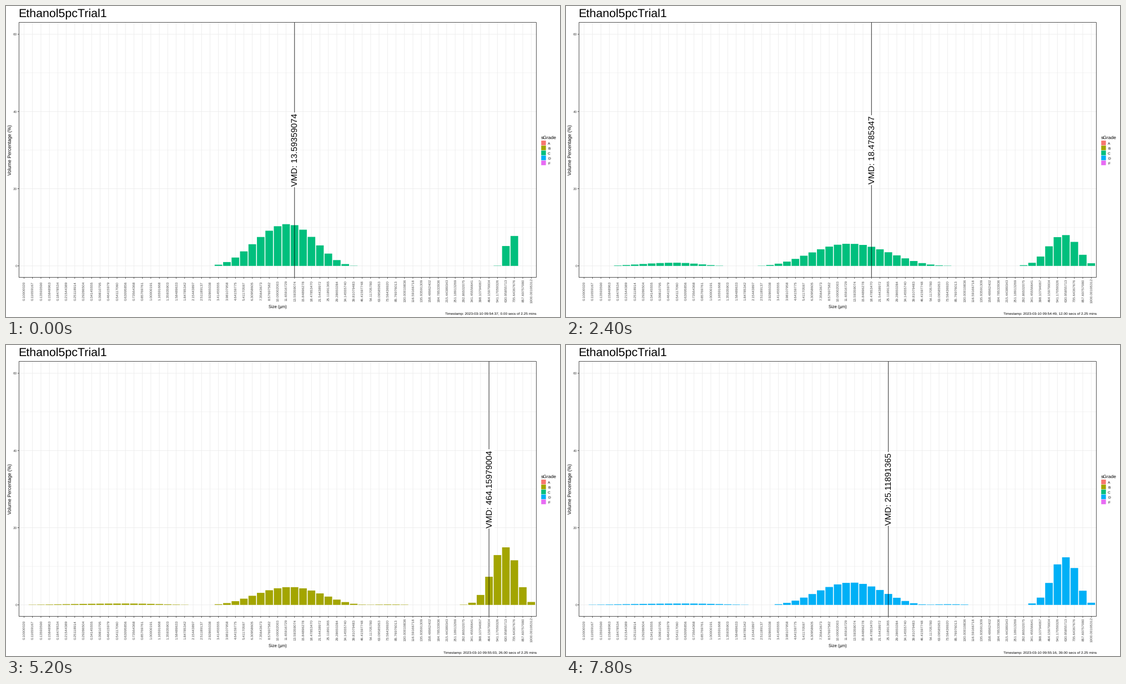
These frames come from a looping animation (998 by 561 pixels, 8000 ms). A matplotlib script:

```python
import numpy as np
import matplotlib.pyplot as plt
from matplotlib.animation import FuncAnimation
from matplotlib.patches import Rectangle

W, H, DPI = 998, 561, 100
FRAMES, INTERVAL = 40, 200
PX = 72 / DPI

plt.rcParams["font.family"] = "Liberation Sans"
plt.rcParams["text.hinting"] = "none"

LEFT, RIGHT, TOP, BOTTOM = 23.35, 955.35, 29.6, 489.5
STEP = (RIGHT - LEFT) / 61.2
ZERO, UNIT = 468.8, 6.963
BINS = np.arange(61)
SIZES = [f"{np.float32(0.1 * 1.00000196 * 10 ** (k / 15)):.8f}" for k in BINS]

COLORS = {"A": "#F8766D", "B": "#A3A500", "C": "#00BF7D",
          "D": "#00B0F6", "F": "#E76BF3"}

# Key moments in seconds; the spray eases linearly between them
KEY_T = [0, 5, 12, 22, 26, 31, 39]
GRADES = "CBCCBCD"
COARSE_SHARE = [13, 28.8, 33.7, 48, 55.2, 66, 44.6]
COARSE_WIDTH = [0.75, 2.5, 2.5, 2.9, 2.2, 2.9, 2.15]
MID_REACH = [8.85, 10, 13, 9.8, 10.2, 11.1, 10.2]
FINE_SHARE = [0, 6.4, 6.2, 3.6, 4.2, 4, 4.2]
FINE_REACH = [30, 5.25, 10.5, 17.5, 17.5, 17.5, 17.5]
TOTAL = 101.5


def bin_x(k):
    return LEFT + (k + 0.6) * STEP


def val_y(v):
    return ZERO - v * UNIT


def hump(centre, left, right):
    """Rounded mode that ends at its left and right reach."""
    d = BINS - centre
    u = d / np.where(d < 0, left, right)
    return np.clip(1 - u * u, 0, None) ** 3.6


def bell(centre, left, right):
    d = BINS - centre
    u = np.abs(d) / np.where(d < 0, left, right)
    return np.exp(-u ** np.where(d < 0, 2.1, 2.4))


def spread(share, shape):
    return share * shape / shape.sum()


def volumes(t):
    coarse, width, reach, fine, fine_reach = (
        np.interp(t, KEY_T, key) for key in
        (COARSE_SHARE, COARSE_WIDTH, MID_REACH, FINE_SHARE, FINE_REACH))
    v = spread(fine, hump(9 + 0.175 * fine_reach, fine_reach, 2 + 0.5 * fine_reach))
    v += spread(coarse, bell(58 - 0.51 * width, width, 0.9 * width))
    pulse = min(1, t / 20) * np.sin(np.pi * t / 15.5) ** 2
    v += 0.17 * pulse * hump(43.2, 5, 5)
    # The middle mode takes whatever volume is left
    mid = hump(31.25 + 0.011 * t, 6.6 + 0.43 * reach, reach)
    v += spread(TOTAL - v.sum(), mid)
    return np.where(v < 0.045, 0, v)


def median_bin(v):
    return int(np.argmax(np.cumsum(v) > 0.507 * v.sum()))


fig = plt.figure(figsize=(W / DPI, H / DPI), dpi=DPI, facecolor="white")
ax = fig.add_axes([0, 0, 1, 1])
ax.set_xlim(0, W)
ax.set_ylim(H, 0)
ax.axis("off")


def line(x0, y0, x1, y1, color, px, z):
    return ax.plot([x0, x1], [y0, y1], color=color, lw=px * PX, zorder=z,
                   solid_capstyle="butt", snap=False)[0]


def box(x, y, w, h, **kw):
    return ax.add_patch(Rectangle((x, y), w, h, snap=False, **kw))


def label(x, y, s, px, ha="left", rot=0, color="black", **kw):
    """Text whose capitals are centred across the line through (x, y)."""
    shift = 0.36 * px
    x, y = (x + shift, y) if rot else (x, y + shift)
    return ax.text(x, y, s, fontsize=px * PX, ha=ha, va="baseline", rotation=rot,
                   rotation_mode="anchor", color=color, **kw)


# Grid, ticks and axis labels
GRID, DARK, GREY = "#EBEBEB", "#333333", "#4D4D4D"
for v in range(0, 61, 10):
    y = val_y(v)
    line(LEFT, y, RIGHT, y, GRID, 0.8 if v % 20 == 0 else 0.5, 1)
    if v % 20 == 0:
        line(LEFT - 2.5, y, LEFT, y, DARK, 0.8, 5)
        label(LEFT - 3, y, str(v), 6.5, "right", color=GREY)
for k in BINS:
    x = bin_x(k)
    line(x, TOP, x, BOTTOM, GRID, 0.8, 1)
    line(x, BOTTOM, x, BOTTOM + 2.5, DARK, 0.8, 5)
    label(x, 513.7, SIZES[k], 6.5, "center", 90, GREY)
box(LEFT, TOP, RIGHT - LEFT, BOTTOM - TOP, fill=False, ec=DARK,
    lw=0.85 * PX, zorder=6)

label(22.5, 12.3, "Ethanol5pcTrial1", 21.4)
label((LEFT + RIGHT) / 2, 543, "Size (µm)", 7.6, "center")
label(6.7, 259, "Volume Percentage (%)", 8.6, "center", 90)

# Legend
label(963.8, 237.3, "sGrade", 8.5)
for i, (grade, color) in enumerate(COLORS.items()):
    y = 247 + 9 * i
    box(964.2, y - 4.2, 8.4, 8.4, fc=color, lw=0)
    label(976, y + 0.3, grade, 6.5)

# Moving parts
VMD_PX = 15.3
bars = [box(bin_x(k) - 0.45 * STEP, ZERO, 0.9 * STEP, 0, lw=0, zorder=3)
        for k in BINS]
marker = line(0, TOP, 0, BOTTOM, "black", 0.8, 4)
vmd = label(0, val_y(30.05), "", VMD_PX, "center", 90, zorder=7,
            bbox=dict(boxstyle="square,pad=0.1", fc="white", ec="none"))
stamp = label(RIGHT + 0.4, 554, "", 6.5, "right")


def update(t):
    v = volumes(t)
    nearest = int(np.argmin(np.abs(np.array(KEY_T) - t)))
    color = COLORS[GRADES[nearest]]
    for bar, height in zip(bars, v):
        bar.set_height(-height * UNIT)
        bar.set_facecolor(color)
        bar.set_visible(height > 0)

    k = median_bin(v)
    x = bin_x(k)
    marker.set_xdata([x, x])
    vmd.set_x(x + 0.36 * VMD_PX)
    vmd.set_text("VMD: " + SIZES[k].rstrip("0"))

    minute, second = divmod(54 * 60 + 37 + t, 60)
    stamp.set_text(f"Timestamp: 2023-03-10 09:{minute:02d}:{second:02d}, "
                   f"{t:.2f} secs of 2.25 mins")
    return bars + [marker, vmd, stamp]


anim = FuncAnimation(fig, update, frames=FRAMES, init_func=lambda: update(0),
                     interval=INTERVAL, repeat=True, repeat_delay=0, blit=False)
plt.show()
```
